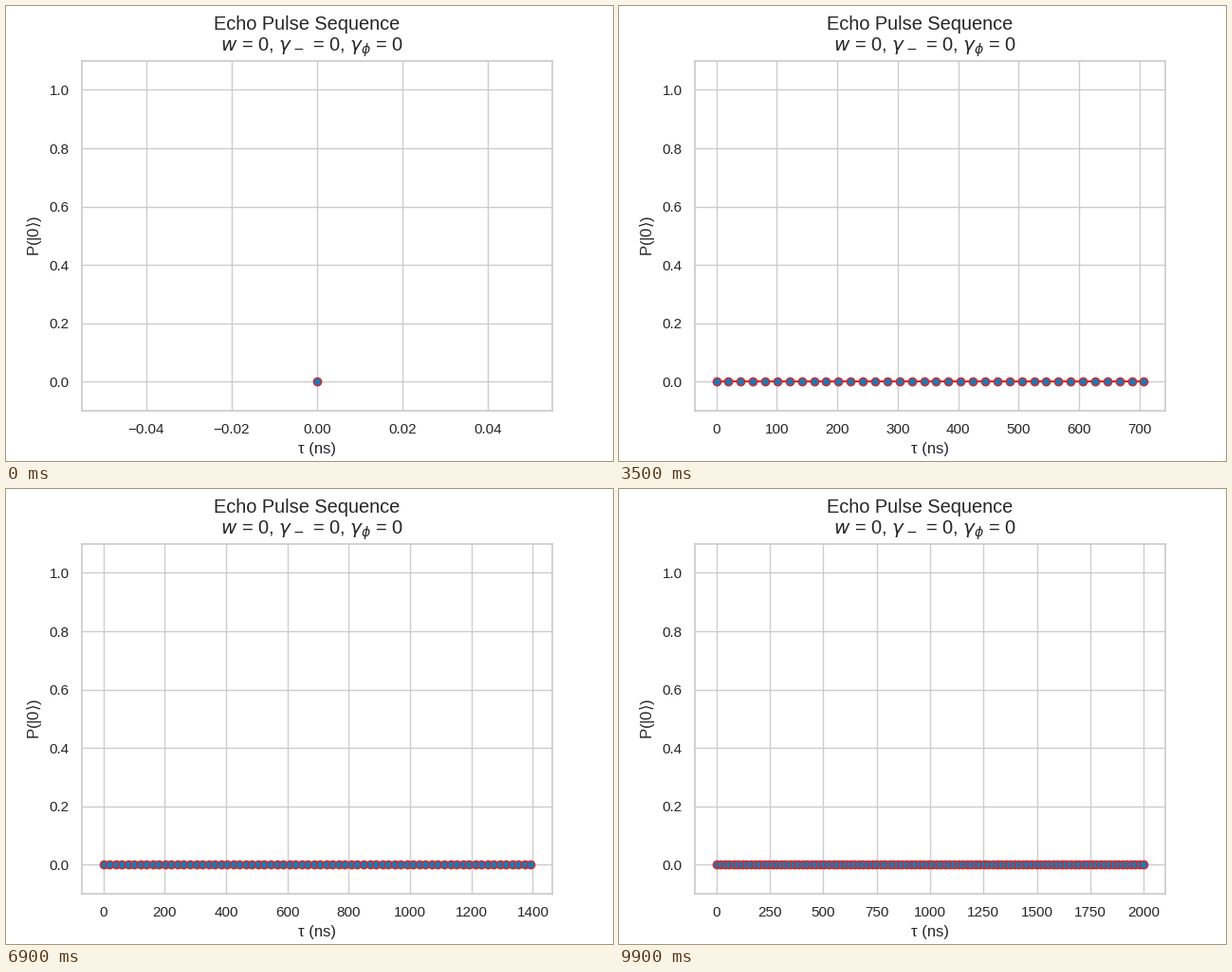
These frames come from a looping animation (640 px wide and 480 px high, 10000 ms). A matplotlib script:

```python
import matplotlib.pyplot as plt
import numpy as np
from matplotlib.animation import FuncAnimation

INK, RULE = "0.15", "0.8"

plt.rcParams.update({
    "font.family": ["Liberation Sans", "DejaVu Sans"],
    "font.size": 12,
    "text.color": INK,
    "axes.labelcolor": INK,
    "axes.labelsize": 12,
    "axes.edgecolor": RULE,
    "axes.linewidth": 1.25,
    "axes.axisbelow": True,
    "axes.grid": True,
    "grid.color": RULE,
    "grid.linewidth": 1,
    "lines.solid_capstyle": "round",
    "xtick.color": INK,
    "ytick.color": INK,
    "xtick.labelsize": 11,
    "ytick.labelsize": 11,
    "xtick.major.size": 6,
    "ytick.major.size": 6,
    "xtick.bottom": False,
    "ytick.left": False,
})

STEPS = 100
tau = np.linspace(0, 2000, STEPS)
prob = np.zeros(STEPS)

fig, ax = plt.subplots(figsize=(6.4, 4.8), dpi=100)
fig.suptitle("Echo Pulse Sequence \n"
             r" $w$ = 0, $\gamma_-$ = 0, $\gamma_\phi$ = 0")
ax.set_xlabel("τ (ns)")
ax.set_ylabel(r"P(|0$\rangle$)")
ax.set_ylim(-0.1, 1.1)
line, = ax.plot([], [], "o-", color="tab:red", markerfacecolor="tab:blue",
                lw=1.5, markersize=6)


def update(i):
    line.set_data(tau[:i + 1], prob[:i + 1])
    ax.relim()
    ax.autoscale_view(scaley=False)
    return line,


anim = FuncAnimation(fig, update, frames=STEPS, interval=100,
                     repeat=True, repeat_delay=0)
plt.show()
```
